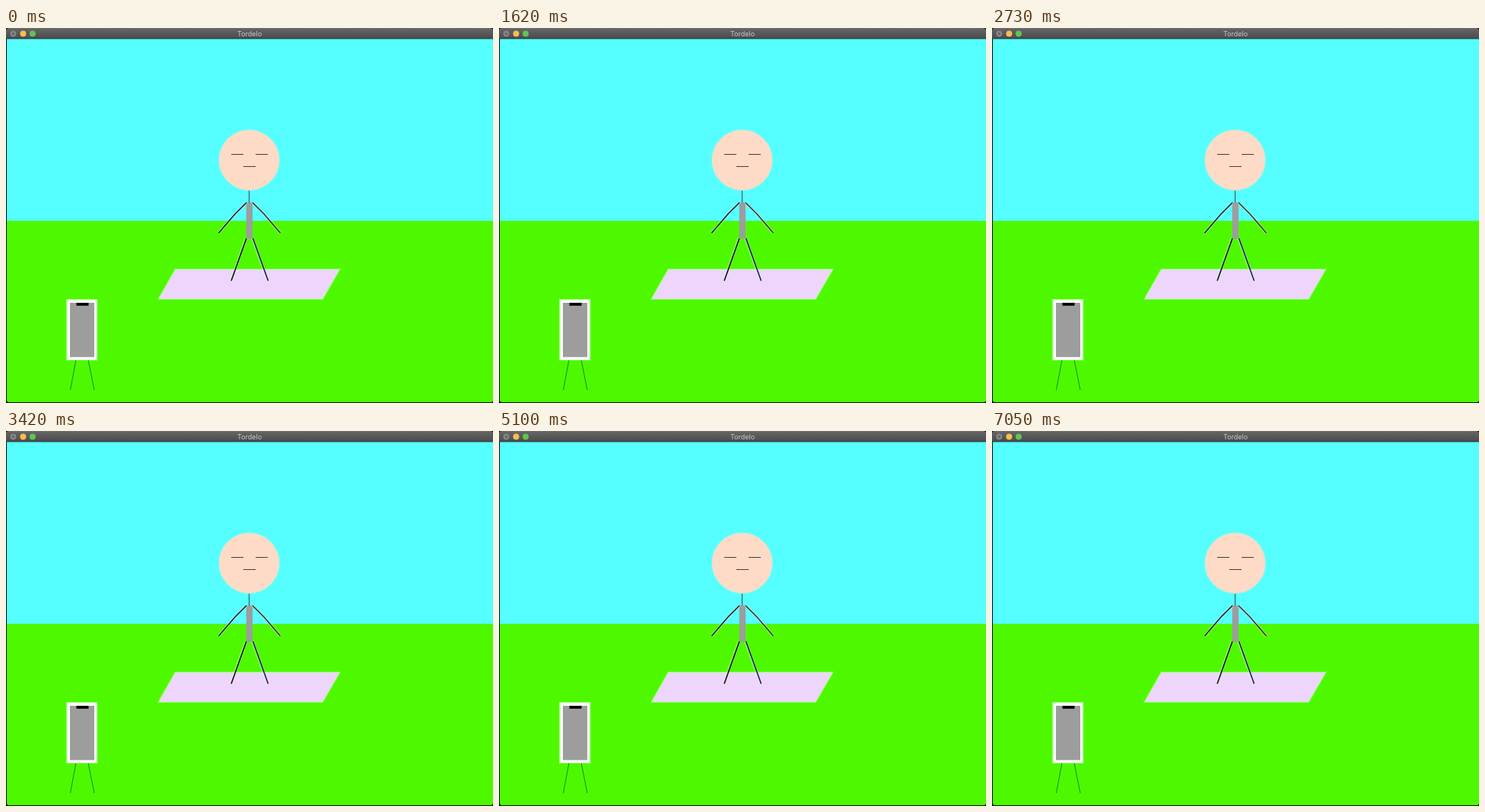
These frames come from a looping animation (640x494 px, 7080 ms). An HTML page:

```html
<!DOCTYPE html>
<html lang="en">
<head>
<meta charset="utf-8">
<title>Dance</title>
<style>
  html, body { margin: 0; width: 100%; height: 100%; overflow: hidden; background: #111; }
  svg { display: block; width: 640px; height: 494px; }
  polyline, polygon.thin { fill: none; stroke-width: 1; vector-effect: non-scaling-stroke; }
  .halo { stroke: #d8ffe0; stroke-opacity: .4; stroke-width: 4; }
  .limb { stroke-width: 1.6; }
  .face { stroke: #4a3a33; }
  text { font: 9px Inter, "Liberation Sans", sans-serif; fill: #c9c9c9; }
</style>
</head>
<body>
<svg viewBox="0 0 640 494">
  <defs>
    <linearGradient id="bar" x2="0" y2="1">
      <stop offset="0" stop-color="#707070"/>
      <stop offset=".15" stop-color="#626262"/>
      <stop offset="1" stop-color="#4b4b4b"/>
    </linearGradient>
  </defs>

  <rect x="1" y="14" width="639" height="240" fill="#55ffff"/>
  <path d="M1 254H640V490Q640 493 637 493H4Q1 493 1 490Z" fill="#4ef900"/>
  <path d="M0 14V4Q0 0 4 0H636Q640 0 640 4V14Z" fill="url(#bar)"/>
  <rect y="13.5" width="640" height="1" fill="#333"/>
  <circle cx="9.5" cy="7.5" r="4" fill="#858585"/>
  <circle cx="9.5" cy="7.5" r="1.3" fill="#555"/>
  <circle cx="22.5" cy="7.5" r="4" fill="#f6be4f"/>
  <circle cx="35" cy="7.5" r="4" fill="#5fc454"/>
  <text x="320" y="11" text-anchor="middle">Tordelo</text>

  <path d="M222.500 318H438.500L416 357H200.500Z" fill="#eed5fc" stroke="#c8f5b8" stroke-opacity=".55" stroke-width="2"/>

  <g id="phone">
    <g id="stand" stroke="#168a20">
      <polyline points="92,437 84.500,477"/>
      <polyline points="108,437 116,477"/>
    </g>
    <rect x="79" y="357" width="41.500" height="81" fill="#d5ffd0" opacity=".6"/>
    <rect x="80.500" y="358" width="38.500" height="79" fill="#fff"/>
    <rect x="84" y="362" width="32" height="71.500" fill="#9d9d9d"/>
    <rect x="92.500" y="362" width="16" height="3.800" fill="#000"/>
  </g>

  <g id="dancer">
    <g id="legs">
      <polyline class="halo" points="315.500,277 295.500,333"/>
      <polyline class="halo" points="324,277 344,333"/>
      <polyline class="limb" stroke="#0c0c10" points="316,277 296,333"/>
      <polyline class="limb" stroke="#20185c" points="324.500,277 344.500,333"/>
    </g>
    <polyline stroke="#2b5058" points="319.500,213 319.500,230"/>
    <rect x="315.700" y="230" width="8.300" height="47.500" fill="#9d9d9d"/>
    <circle cx="319.500" cy="174" r="39.700" fill="#fddbc7" stroke="#c9e9da" stroke-opacity=".6" stroke-width="1.500"/>
    <g id="calm" class="face">
      <polyline points="296,166.500 312,166.500"/>
      <polyline points="328,166.500 344,166.500"/>
      <polyline points="312,182.500 328,182.500"/>
    </g>
    <g id="happy" class="face">
      <polyline points="296,166.500 304,162.500 312,166.500"/>
      <polyline points="328,166.500 336,162.500 344,166.500"/>
      <polygon class="thin" points="312,182.500 328,182.500 320,190.500"/>
    </g>
  </g>

  <g id="down">
    <polyline class="halo" points="316,230 301,245 279.500,270"/>
    <polyline class="halo" points="324,230 339,245 360.500,270"/>
    <polyline class="limb" stroke="#10202a" points="316,230 301,245 279.500,270"/>
    <polyline class="limb" stroke="#40302a" points="324,230 339,245 360.500,270"/>
  </g>
  <g id="up">
    <polyline class="limb" stroke="#101418" points="263,230.300 292,228.800 316,230.300"/>
    <polyline class="limb" stroke="#a8452c" points="324,230.300 349,228.800 378,230.300"/>
  </g>
</svg>
<script>
const LOOP = 7080;
const LEAN = [1920, 2610];
const KICK = [4080, 4770];
const $ = id => document.getElementById(id);
const within = (t, [from, to]) => t >= from && t < to;

// Horizontal shear that keeps the line at height y fixed.
const shear = (id, k, y) => $(id).setAttribute('transform', `matrix(1 0 ${k} 1 ${-k * y} 0)`);
const show = (id, on) => $(id).setAttribute('visibility', on ? 'visible' : 'hidden');

function draw(now) {
  const t = now % LOOP;
  const lean = within(t, LEAN) ? 0.5 : 0;
  const kick = within(t, KICK) ? -0.5 : 0;
  const active = lean !== 0 || kick !== 0;

  shear('dancer', lean, 333);
  shear('phone', lean, 477);
  shear('legs', kick, 277);
  shear('stand', kick, 437);
  $('up').setAttribute('transform', `translate(${-lean * 104} 0)`);

  show('happy', active);
  show('up', active);
  show('calm', !active);
  show('down', !active);
}

const start = performance.now();
function tick() {
  draw(performance.now() - start);
  requestAnimationFrame(tick);
}
tick();
</script>
</body>
</html>
```
